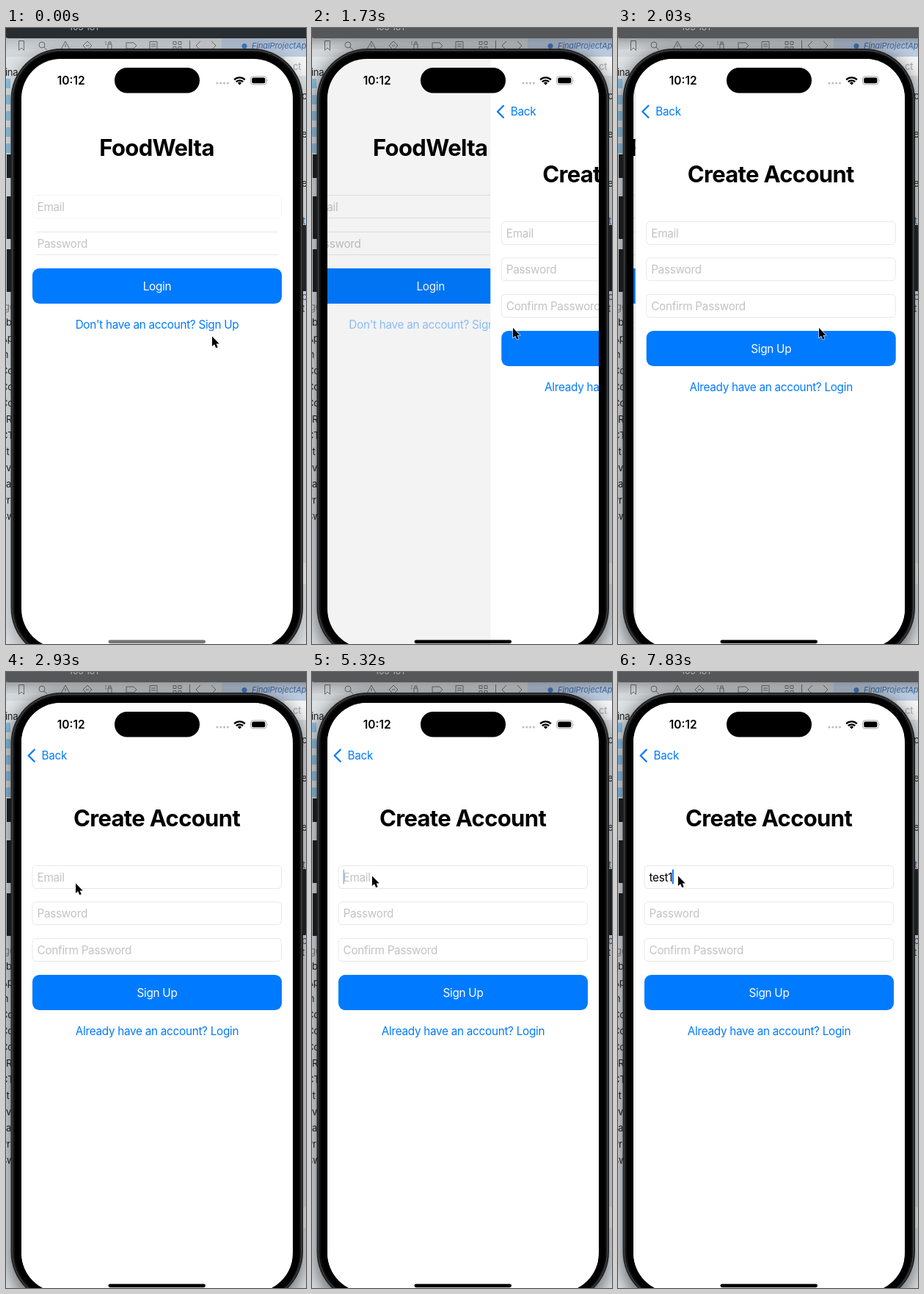
Recreate the animation shown at these times as an HTML page. Size 409 by 838 pixels, loop 8000 ms.

```html
<!DOCTYPE html>
<html lang="en">
<head>
<meta charset="utf-8">
<title>Sign-up flow</title>
<style>
html, body { margin: 0; width: 100%; height: 100%; overflow: hidden; background: #d5d9dc; }
svg { display: block; width: 409px; height: 838px; }
text { font: 400 15.3px Inter, sans-serif; font-optical-sizing: none; letter-spacing: -.29px; white-space: pre; }
.title { font-weight: 700; font-size: 31px; letter-spacing: -.65px; }
.clock { font-weight: 600; font-size: 15.5px; letter-spacing: 0; }
.mid { text-anchor: middle; }
.link { fill: #007aff; }
.hint { fill: #c3c3c5; }
.side text { font-size: 13px; fill: #222; }
.icons { fill: none; stroke: #6c7175; stroke-width: 1; }
.tab { font-size: 11px; font-style: italic; letter-spacing: -.1px; fill: #416faa; }
.caption { font-size: 12px; letter-spacing: 0; fill: #b5b7b9; }
.field { fill: #fff; stroke: #e7e7e8; }
#pass { stroke-dasharray: 329.5 36.7; }
</style>
</head>
<body>
<svg viewBox="0 0 409 838">
  <defs>
    <clipPath id="screen"><rect x="21" y="42" width="370" height="802" rx="54"/></clipPath>
    <filter id="blur" x="-20%" y="-20%" width="140%" height="140%"><feGaussianBlur stdDeviation="11"/></filter>
  </defs>

  <!-- desktop behind the phone -->
  <rect width="409" height="838" fill="#dde2e5"/>
  <rect y="12" width="294" height="27" fill="#d3d7da"/>
  <rect x="294" y="12" width="115" height="27" fill="#bccbdf"/>
  <rect x="380" y="39" width="29" height="26" fill="#f4f5f6"/>
  <g class="side" id="side"></g>
  <g class="icons">
    <path d="M17.500 17.500h7v13l-3.500-3.500l-3.500 3.500z"/>
    <circle cx="49" cy="23" r="4"/><path d="M52 26l4 4"/>
    <path d="M81 18l6 11h-12zM81 22v4"/>
    <path d="M111 18l6 6l-6 6l-6-6zM109 24h4"/>
    <path d="M139 22h5v8h-5zM140 22v-3h3v3M135 19h2M135 22h2"/>
    <path d="M164 20h10l4 4l-4 4h-10z"/>
    <path d="M196 18.500h10v11h-10zM198 22h6M198 25h6"/>
    <path d="M228 18.500h4v4h-4zM235 18.500h4v4h-4zM228 25.500h4v4h-4zM235 25.500h4v4h-4z"/>
    <path d="M250.500 17v14M265 18l-6 6l6 6M280 18l6 6l-6 6"/>
  </g>
  <circle cx="325" cy="24.500" r="3.500" fill="#477fc4"/>
  <text class="tab" x="335" y="28">FinalProjectAp</text>
  <g id="shadow">
    <rect x="5" y="30" width="400" height="840" rx="70" filter="url(#blur)"/>
    <rect x="-30" y="-60" width="470" height="74" filter="url(#blur)"/>
  </g>
  <rect id="bar" x="-3" y="-20" width="418" height="34" rx="7"/>
  <text class="caption" x="86" y="3">105 181</text>

  <!-- phone -->
  <rect x="6.500" y="28" width="398.500" height="830" rx="69" fill="#222426"/>
  <rect x="9" y="30.500" width="393.500" height="825" rx="66.500" fill="#111" stroke="#4a4c4e"/>
  <rect x="12" y="33" width="388" height="820" rx="63"/>

  <g clip-path="url(#screen)">
    <g id="login">
      <rect x="21" y="41" width="480" height="803" fill="#fff"/>
      <text class="title mid" x="205.500" y="174">FoodWelta</text>
      <g id="loginFields"></g>
      <text id="loginLink" class="link mid" x="206" y="408.500">Don't have an account? Sign Up</text>
      <rect id="dim" x="21" y="41" width="480" height="803" opacity="0"/>
    </g>
    <g id="signup">
      <rect x="21" y="41" width="371" height="803" fill="#fff"/>
      <path d="M38.700 105.800l-8 8l8 8" fill="none" stroke="#007aff" stroke-width="2.300" stroke-linecap="round" stroke-linejoin="round"/>
      <text class="link" x="48.500" y="119">Back</text>
      <text class="title mid" x="205.500" y="209.500">Create Account</text>
      <g id="signupFields"></g>
      <text id="typed" x="42.500" y="284.500"></text>
      <rect id="caret" y="268.500" width="2" height="20" rx="1" fill="#0a72e8"/>
      <text class="link mid" x="206" y="493.500">Already have an account? Login</text>
    </g>
    <!-- status bar -->
    <text class="clock" x="69.700" y="77">10:12</text>
    <rect x="148" y="54" width="116" height="34.500" rx="17.200"/>
    <path d="M288 75h15" stroke="#bcbcbe" stroke-width="3" stroke-linecap="round" stroke-dasharray="0 4.800"/>
    <g fill="none" stroke="#000" stroke-width="2.300">
      <path d="M311.200 70.300a10.500 10.500 0 0 1 14.600 0M313.800 73.200a6.800 6.800 0 0 1 9.400 0"/>
    </g>
    <path d="M318.500 77.500l-2.700-2.800a3.900 3.900 0 0 1 5.400 0z"/>
    <rect x="333.500" y="65.900" width="21.500" height="11" rx="3.400" fill="none" stroke="#a5a5a7"/>
    <rect x="335.200" y="67.600" width="18.100" height="7.600" rx="2"/>
    <path d="M356.400 69.700q1.600 1.700 0 3.400z" fill="#a5a5a7"/>
    <rect id="home" x="139.500" y="832.500" width="132.500" height="4.700" rx="2.350"/>
  </g>

  <path id="pointer" d="M0 0V13.600L3.100 10.800L5.300 15.800L7.700 14.800L5.600 9.900H9.700Z" stroke="#fff" stroke-width="1.200" stroke-linejoin="round" paint-order="stroke"/>
</svg>
<script>
const $ = id => document.getElementById(id);
const set = (id, attrs) => { for (const k in attrs) $(id).setAttribute(k, attrs[k]); };

const box = (x, y, w, h, fill) => `<rect x="${x}" y="${y}" width="${w}" height="${h}" fill="${fill}"/>`;
const label = (x, y, s, fill = "#222") => `<text x="${x}" y="${y}" style="fill:${fill}">${s}</text>`;
const field = (y, hint, id) => `<rect class="field" id="${id}" x="36" y="${y}" width="339.500" height="31" rx="5"/>
  <text class="hint" id="${id}Hint" x="42.500" y="${y + 21.3}">${hint}</text>`;
const button = (y, name) => `<rect x="36" y="${y}" width="340" height="48" rx="9.400" fill="#007aff"/>
  <text class="mid" x="206" y="${y + 29.5}" fill="#fff">${name}</text>`;

// Slivers of the windows visible beside the phone
$("side").innerHTML =
  [75, 97, 119, 141, 163].map(y => box(-3, y - 6, 9, 13, "#8fc3e6")).join("") +
  [[172, 32], [229, 58], [301, 58]].map(([y, h]) => box(1, y, 6, h, "#1f2225")).join("") +
  ["b", "Ap", "in", "Co", "Co", "Co", "R", "CT", "nt", "ev", "a", "Pr", "Sw"]
    .map((s, i) => label(s.length > 1 ? -7 : 0, 405 + 22 * i, s)).join("") +
  label(-1, 65, "ina") + label(-3, 384, "ge", "#888") + label(391, 57, "ct", "#aaa") +
  [[97, "p"], [149, "e"], [216, "e"], [386, "t"]].map(([y, s]) => label(403, y, s)).join("") +
  label(404, 267, "t", "#2b6cb8") + label(403, 370, "p", "#5b35b0") +
  box(402, 268, 8, 90, "#25282d") + box(400, 728, 9, 28, "#eef0f1");

$("loginFields").innerHTML = field(227.5, "Email", "user") + field(277.5, "Password", "pass") + button(327, "Login");
$("signupFields").innerHTML = field(263.5, "Email", "email") + field(312.8, "Password", "new") +
  field(362.5, "Confirm Password", "again") + button(412, "Sign Up");

// Held values: [start in ms, value...]
const pointerKeys = [[0, 281, 419.5], [230, 280.5, 419], [530, 277, 413], [680, 274, 408],
  [2480, 245, 386], [2630, 130, 318], [2780, 70, 290], [2930, 95, 287.5],
  [3680, 91, 284], [3830, 84, 279], [3970, 82, 277.5]];
const typedKeys = [[0, ""], [5470, "t"], [5620, "tes"], [5760, "test"], [6800, "test1"]];
const caretKeys = [[0, 0], [3830, 1], [4270, .4], [4420, 0], [4720, 1], [5320, .4], [5470, 1],
  [6210, .4], [6350, 0], [6650, 1], [7390, .4], [7530, 0], [7830, 1]];
const linkKeys = [[0, 1], [1580, .3], [1730, .43]];
const at = (keys, t) => keys.findLast(k => k[0] <= t).slice(1);

function draw(t) {
  const focused = t >= 980, pressed = t >= 1580;
  set("bar", { fill: focused ? "#555759" : "#282d31" });
  set("shadow", { opacity: focused ? .5 : .26 });
  set("home", { fill: pressed ? "#000" : "#757575" });
  $("user").style.stroke = pressed ? "#e7e7e8" : "#f6f6f6";

  // Critically damped push, seen in 150 ms steps
  const seen = 1580 + Math.floor((t - 1580) / 150) * 150;
  const w = Math.max(0, (seen - 1656.5) * .0187);
  const rest = (1 + w) * Math.exp(-w);
  const shift = rest < .002 ? 0 : rest * 370;
  set("login", { transform: `translate(${-111 * (1 - rest)})` });
  set("signup", { transform: `translate(${shift})`, visibility: w ? "visible" : "hidden" });
  set("dim", { opacity: .12 * (1 - rest) });
  set("loginLink", { opacity: at(linkKeys, t)[0] });

  const [word] = at(typedKeys, t);
  $("typed").textContent = word;
  set("emailHint", { opacity: word ? 0 : 1 });
  const end = word ? $("typed").getComputedTextLength() : 0;
  set("caret", { x: 42.2 + end, opacity: at(caretKeys, t)[0] });

  const [x, y] = at(pointerKeys, t);
  set("pointer", { transform: `translate(${x} ${y})` });
}

const start = performance.now();
(function tick() {
  draw((performance.now() - start) % 8000);
  requestAnimationFrame(tick);
})();
</script>
</body>
</html>
```
